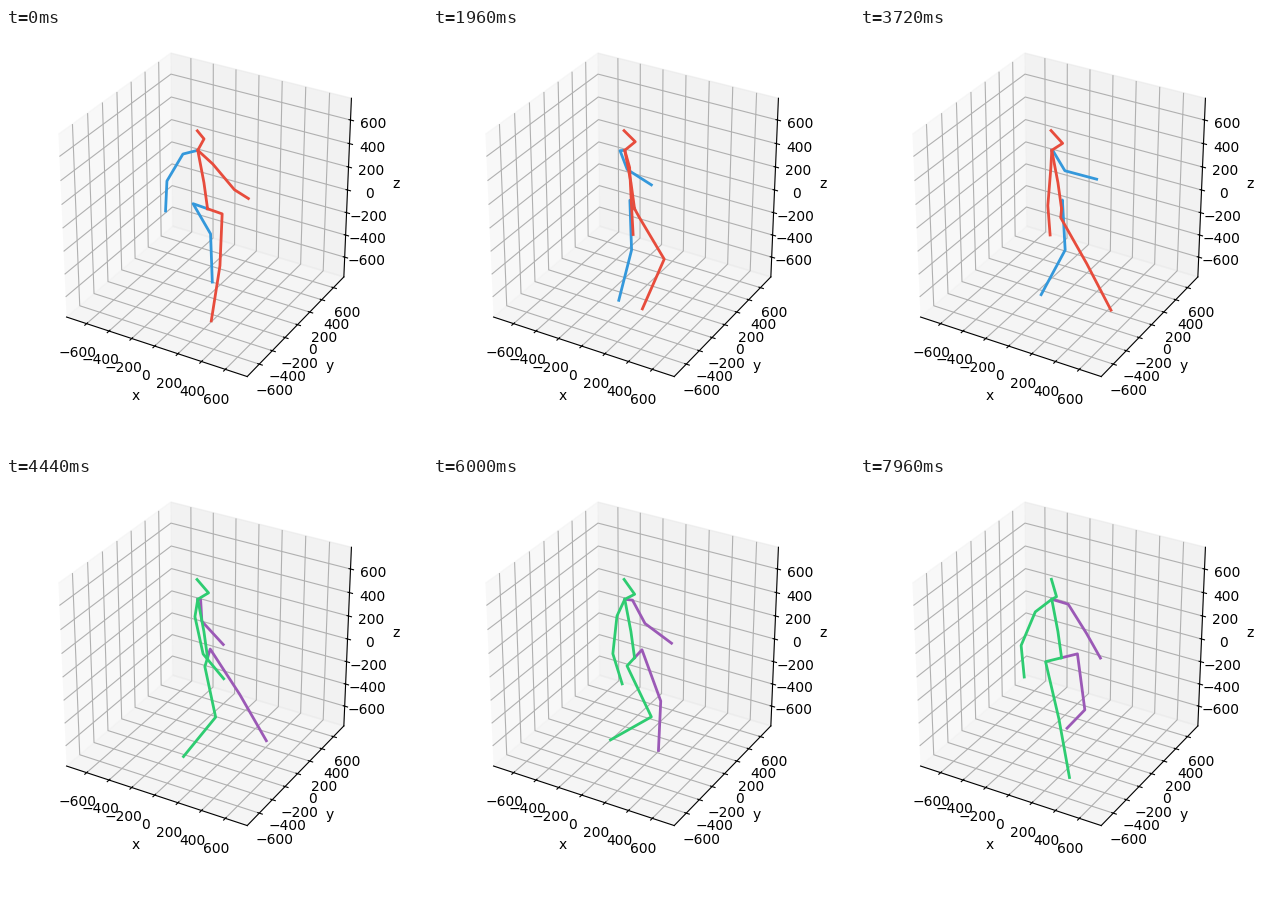
These frames come from a looping animation (421 px wide and 421 px high, 8 s). A matplotlib script:

```python
import numpy as np
import matplotlib.pyplot as plt
from matplotlib.animation import FuncAnimation

SIZE, FRAMES, STEP = 421, 200, 40
LIMIT = 781.25
CYCLE = 1.39                      # seconds per stride
WALK = {"left": "#3498db", "right": "#e74c3c"}
FORECAST = {"left": "#9b59b6", "right": "#2ecc71"}
UP = np.array([0, 0, 1.0])
SCREEN_RIGHT = np.array([np.cos(np.pi / 6), 0.5, 0])

fig = plt.figure(figsize=(SIZE / 100, SIZE / 100), dpi=100, facecolor="white")
ax = fig.add_axes([0.0511, 0.1430, 0.8328, 0.8328], projection="3d")
ax.set_box_aspect((1, 1, 1))
ax.view_init(30, -60)


def ease(t, start, end):
    u = np.clip((t - start) / (end - start), 0, 1)
    return u * u * (3 - 2 * u)


def wave(phase, peak, harmonic=1):
    return np.cos(2 * np.pi * harmonic * (phase - peak))


def heading(degrees):
    a = np.radians(degrees)
    return np.array([np.cos(a), np.sin(a), 0])


def bone(length, angle, ahead):
    """Limb hanging down, swung forward by an angle in degrees."""
    a = np.radians(angle)
    return length * (np.sin(a) * ahead - np.cos(a) * UP)


def leg(hip, phase, stoop, ahead):
    thigh = 14 + 18 * wave(phase, 0.9) + 10 * stoop
    shin = -8 + 24 * wave(phase, 0.05) + 12 * wave(phase, 0.47, 2)
    knee = hip + bone(442, thigh, ahead)
    return [hip, knee, knee + bone(452, shin * (1 + 0.4 * stoop), ahead)]


def arm(shoulder, phase, bend, ahead, out):
    swing = wave(phase, 0.4)
    elbow = shoulder + 120 * out + bone(252, 8 + 18 * swing, ahead)
    return [shoulder, elbow, elbow + bone(250, 22 + 28 * swing + bend, ahead)]


def pose(t):
    """Limb chains of the walker, hips fixed, slowly turning to the right."""
    u = t / 4 - 1
    yaw = 25 - 60 * u * (0.55 + 0.45 * u * u)
    ahead, right = heading(yaw), heading(yaw - 90)
    phase = 0.36 + t / CYCLE
    stoop = ease(t, 3.5, 5)

    root = np.zeros(3)
    spine = 225 * UP - 27 * SCREEN_RIGHT
    neck = 497 * UP - 72 * SCREEN_RIGHT
    head = neck + 80 * ahead + 60 * UP
    crown = head - 85 * ahead + 104 * UP
    chains = []
    for side, out, shift, bend in [("left", -right, 0.5, 35 * ease(t, 1, 4)),
                                   ("right", right, 0, 0)]:
        p = phase + shift
        shoulder = neck + 135 * out - 73 * UP
        chains.append((side, [root] + leg(133 * out, p, stoop, ahead)))
        chains.append((side, [neck] + arm(shoulder, p, bend, ahead, out)))
    chains.append(("right", [root, spine, neck, head, crown]))
    return chains


limbs = [ax.plot([], [], [], lw=2)[0] for _ in pose(0)]

ticks = range(-600, 601, 200)
ax.set(xlim=(-LIMIT, LIMIT), ylim=(-LIMIT, LIMIT), zlim=(-LIMIT, LIMIT),
       xticks=ticks, yticks=ticks, zticks=ticks)
ax.tick_params(pad=2.7)
ax.set_xlabel("x", labelpad=2.3)
ax.set_ylabel("y", labelpad=2.3)
ax.set_zlabel("z", labelpad=2.3)


def draw(k):
    colors = WALK if k < FRAMES // 2 else FORECAST
    for line, (side, points) in zip(limbs, pose(k * STEP / 1000)):
        line.set_data_3d(*np.transpose(points))
        line.set_color(colors[side])
    return limbs


anim = FuncAnimation(fig, draw, frames=FRAMES, interval=STEP,
                     repeat=True, repeat_delay=0, blit=False)
plt.show()
```
